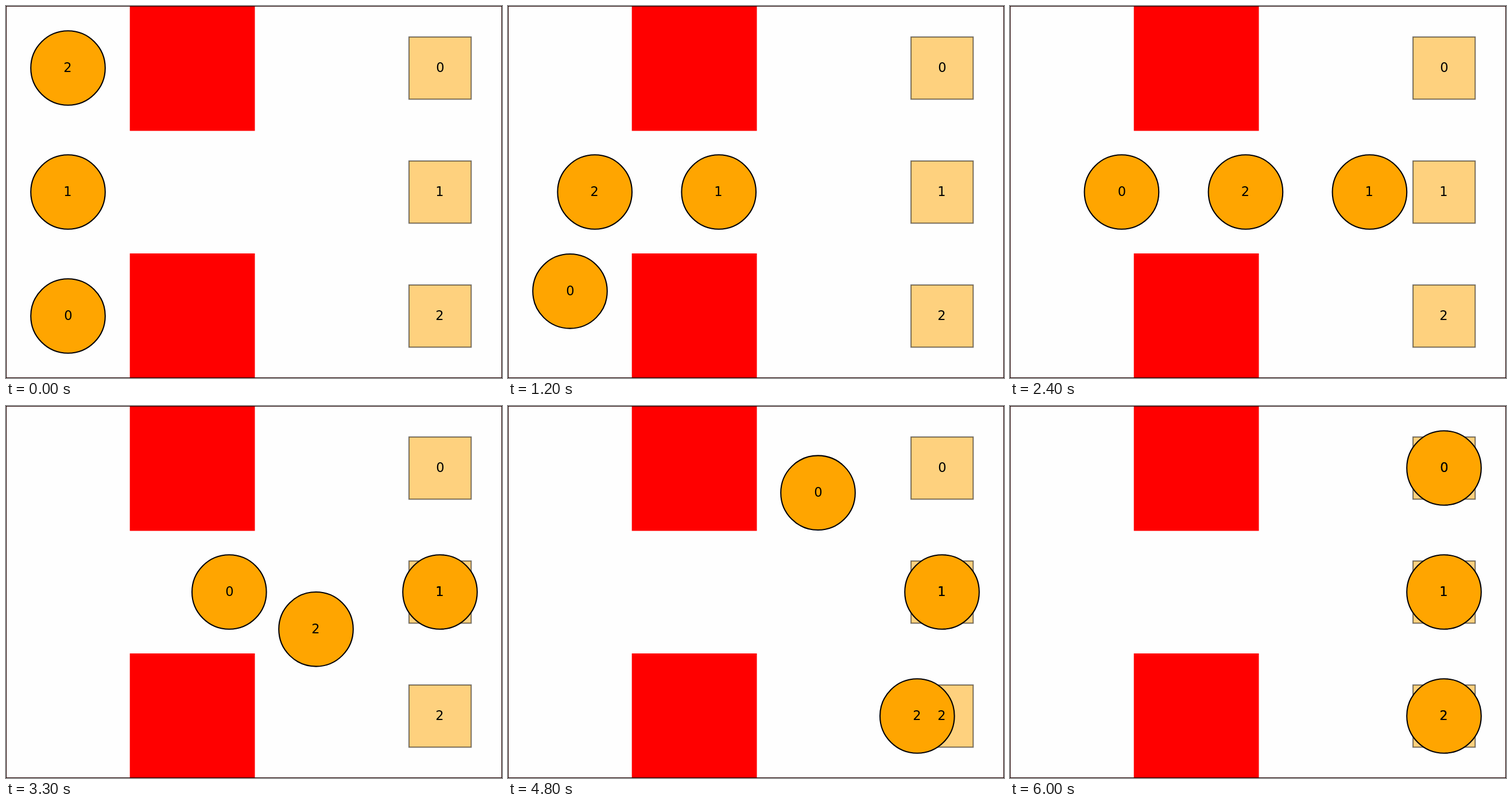
An HTML page for the animation above (7000 ms loop, 864 px wide and 648 px high).

```html
<!DOCTYPE html>
<html lang="en">
<head>
<meta charset="utf-8">
<title>Agents through a gap</title>
<style>
  html, body { margin: 0; width: 100%; height: 100%; overflow: hidden; background: #fefefe; }
  svg { display: block; width: 100vw; height: 100vh; }
  text { font: 22.5px "DejaVu Sans", sans-serif; text-anchor: middle; }
</style>
</head>
<body>
<svg id="stage" viewBox="0 0 864 648"></svg>
<script>
const CELL = 216, STEP = 100, STEPS = 60, LOOP = 7000;
const NUDGE = [0.5, -0.7, -0.5];

// Grid cell [column, row] of each agent at every whole second
const routes = [
  [[0, 2], [0, 2], [0, 1], [1, 1], [2, 1], [2, 0], [3, 0]],
  [[0, 1], [1, 1], [2, 1], [3, 1], [3, 1], [3, 1], [3, 1]],
  [[0, 0], [0, 1], [1, 1], [2, 1], [2, 2], [3, 2], [3, 2]]
];

const stage = document.getElementById("stage");

function add(tag, attrs) {
  const el = document.createElementNS("http://www.w3.org/2000/svg", tag);
  return set(el, attrs);
}

function set(el, attrs) {
  for (const key in attrs) el.setAttribute(key, attrs[key]);
  stage.appendChild(el);
  return el;
}

function move(el, attrs) {
  for (const key in attrs) el.setAttribute(key, attrs[key]);
}

const center = cell => (cell + 0.5) * CELL;

function labelAt(id, x, y) {
  return { x: x + NUDGE[id], y: Math.round(y + 7) };
}

function addLabel(id, x, y) {
  add("text", labelAt(id, x, y)).textContent = id;
  return stage.lastChild;
}

add("rect", { width: 864, height: 648, fill: "#fefefe" });
for (const [y, height] of [[0, 217.5], [431, 217]]) {
  add("rect", { x: 215.7, y, width: 217.8, height, fill: "#f00" });
}

const goals = routes.map(route => route[route.length - 1].map(center));
for (const [x, y] of goals) {
  add("rect", {
    x: x - 54, y: y - 54, width: 108.3, height: 108.3,
    fill: "#ffa500", stroke: "#000", "stroke-width": 2.1, opacity: 1,
    "fill-opacity": 0.5, "stroke-opacity": 0.5
  });
}

const discs = routes.map(() => add("circle", {
  r: 64.8, fill: "#ffa500", stroke: "#000", "stroke-width": 2.1
}));
goals.forEach(([x, y], id) => addLabel(id, x, y));
const labels = routes.map((route, id) => addLabel(id, 0, 0));

add("rect", { width: 864, height: 648, fill: "none", stroke: "#200000", "stroke-width": 2.1 });

function draw(time) {
  const step = Math.min(Math.floor((time % LOOP) / STEP), STEPS);
  const leg = Math.min(Math.floor(step / 10), 5);
  const part = step / 10 - leg;
  routes.forEach((route, id) => {
    const [x, y] = [0, 1].map(axis => {
      const from = route[leg][axis], to = route[leg + 1][axis];
      return center(from + (to - from) * part);
    });
    move(discs[id], { cx: x, cy: y });
    move(labels[id], labelAt(id, x, y));
  });
}

const start = performance.now();
function tick() {
  draw(performance.now() - start);
  requestAnimationFrame(tick);
}
tick();
</script>
</body>
</html>
```
